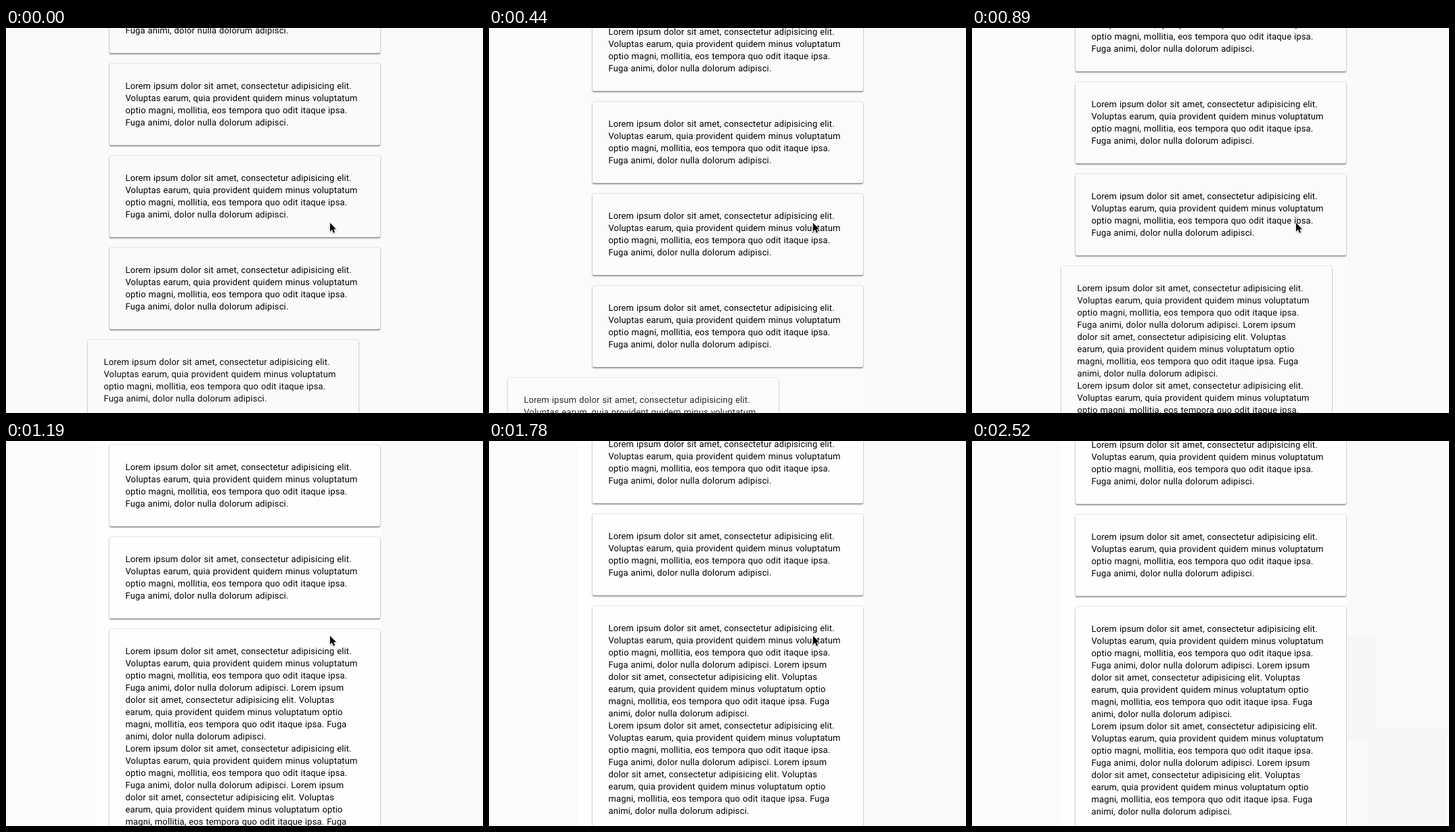
An HTML page for the animation above (2.82 s loop, 705x569 px).

```html
<!DOCTYPE html>
<html lang="en">
<head>
<meta charset="utf-8">
<title>Cards sliding in on scroll</title>
<style>
  html, body { margin: 0; width: 100%; height: 100%; overflow: hidden; }
  #stage { position: relative; width: 705px; height: 569px; overflow: hidden; background: #fafafa; }
  #stage > * { position: absolute; }
  .wash { left: 0; top: 0; width: 555px; height: 100%; background: #fbfbfb; }
  .column { left: 131px; top: 0; width: 424px; height: 100%; background: #fefefe; }
  .trail { background: #f6f6f6; }
  .card {
    left: 153px; top: 0; box-sizing: border-box; width: 400px; padding: 25px 0 23px 23.5px;
    border-radius: 2px;
    box-shadow: 0 2px 2px rgba(0, 0, 0, .36), 0 0 2px rgba(0, 0, 0, .32);
    font: 13px/18px Roboto, Inter, sans-serif;
    letter-spacing: .13px; word-spacing: .5px;
    white-space: pre; color: #000; text-rendering: geometricPrecision;
  }
  #pointer { left: 0; top: 0; overflow: visible; filter: drop-shadow(0 1px 1px rgba(0, 0, 0, .3)); }
</style>
</head>
<body>
<div id="stage"></div>
<script>
const LOOP = 2820, STEP = 148.4, STEP_LEAD = 7;
const HEIGHT = 569, PITCH = 136, SMALL_CARDS = 8;
const stage = document.getElementById('stage');

const opening = [
  'Lorem ipsum dolor sit amet, consectetur adipisicing elit.',
  'Voluptas earum, quia provident quidem minus voluptatum',
  'optio magni, mollitia, eos tempora quo odit itaque ipsa.'
];
const shortText = [...opening, 'Fuga animi, dolor nulla dolorum adipisci.'];
const paragraph = [
  ...opening,
  'Fuga animi, dolor nulla dolorum adipisci. Lorem ipsum',
  'dolor sit amet, consectetur adipisicing elit. Voluptas',
  'earum, quia provident quidem minus voluptatum optio',
  'magni, mollitia, eos tempora quo odit itaque ipsa. Fuga',
  'animi, dolor nulla dolorum adipisci.'
];

function add(className, text = '') {
  const el = document.createElement('div');
  el.className = className;
  el.textContent = text;
  stage.append(el);
  return el;
}

function addCard(lines) {
  return { el: add('card', lines.join('\n')), height: 48 + 18 * lines.length };
}

// Top of the tall last card: a fling, a glide past the end, then a bounce back.
function scrollTop(step) {
  if (step < 6) return 352 + 91.8 * (6 - step) + 2.83 * (6 - step) ** 2;
  if (step < 10) return 196 + 156 * 0.726 ** (step - 6);
  return 245 - 6 * 0.5 ** (step - 10);
}

const LEAVE = 13, GONE = 17;
function pointerAt(step) {
  const p = Math.min(1, Math.max(0, step - LEAVE) * 0.51);
  return { x: 479 + 213 * p, y: 288 + 271 * p };
}

// Faint boxes stay behind where the pointer has passed.
function addTrail(step) {
  const from = pointerAt(step - 1), to = pointerAt(step);
  const el = add('trail');
  el.style.left = `${from.x - 3}px`;
  el.style.top = `${from.y - 1}px`;
  el.style.width = `${to.x - from.x + 13}px`;
  el.style.height = `${to.y - from.y + 18}px`;
  return { el, from: step };
}

const panels = [{ el: add('wash'), from: 3 }];
for (let step = LEAVE + 1; step < GONE; step++) panels.push(addTrail(step));
panels.push({ el: add('column'), from: 7 });

// Cards are counted upwards from the tall one at the end of the list.
const cards = [addCard([...paragraph, ...paragraph])];
for (let i = 0; i < SMALL_CARDS; i++) cards.push(addCard(shortText));

stage.insertAdjacentHTML('beforeend', `
  <svg id="pointer" width="14" height="18">
    <path d="M0 0V12.8L2.9 10.1L5 14.8L7.1 13.9L5.1 9.3H9Z"
      stroke="#fff" stroke-width="1.4" paint-order="stroke" stroke-linejoin="round"/>
  </svg>`);
const pointer = document.getElementById('pointer');

// A card slides in from the left as more of it comes into view.
function placeCard({ el, height }, top) {
  const shown = Math.min(1, (HEIGHT - top) / (64 + 0.525 * height));
  el.style.transform = `translate(${Math.round(211 * (shown - 1))}px, ${top}px)`;
  el.style.opacity = shown < 0.2 ? 0 : 0.7 + 0.3 * shown;
}

function render(time) {
  const step = Math.floor((time + STEP_LEAD) / STEP);
  const lastTop = Math.round(scrollTop(step));
  cards.forEach((card, i) => placeCard(card, lastTop - i * PITCH));
  for (const { el, from } of panels) el.style.display = step >= from ? 'block' : 'none';
  const { x, y } = pointerAt(step);
  pointer.style.transform = `translate(${Math.round(x)}px, ${Math.round(y)}px)`;
  pointer.style.display = step < GONE ? 'block' : 'none';
}

const start = performance.now();
function tick() {
  render((performance.now() - start) % LOOP);
  requestAnimationFrame(tick);
}
tick();
</script>
</body>
</html>
```
